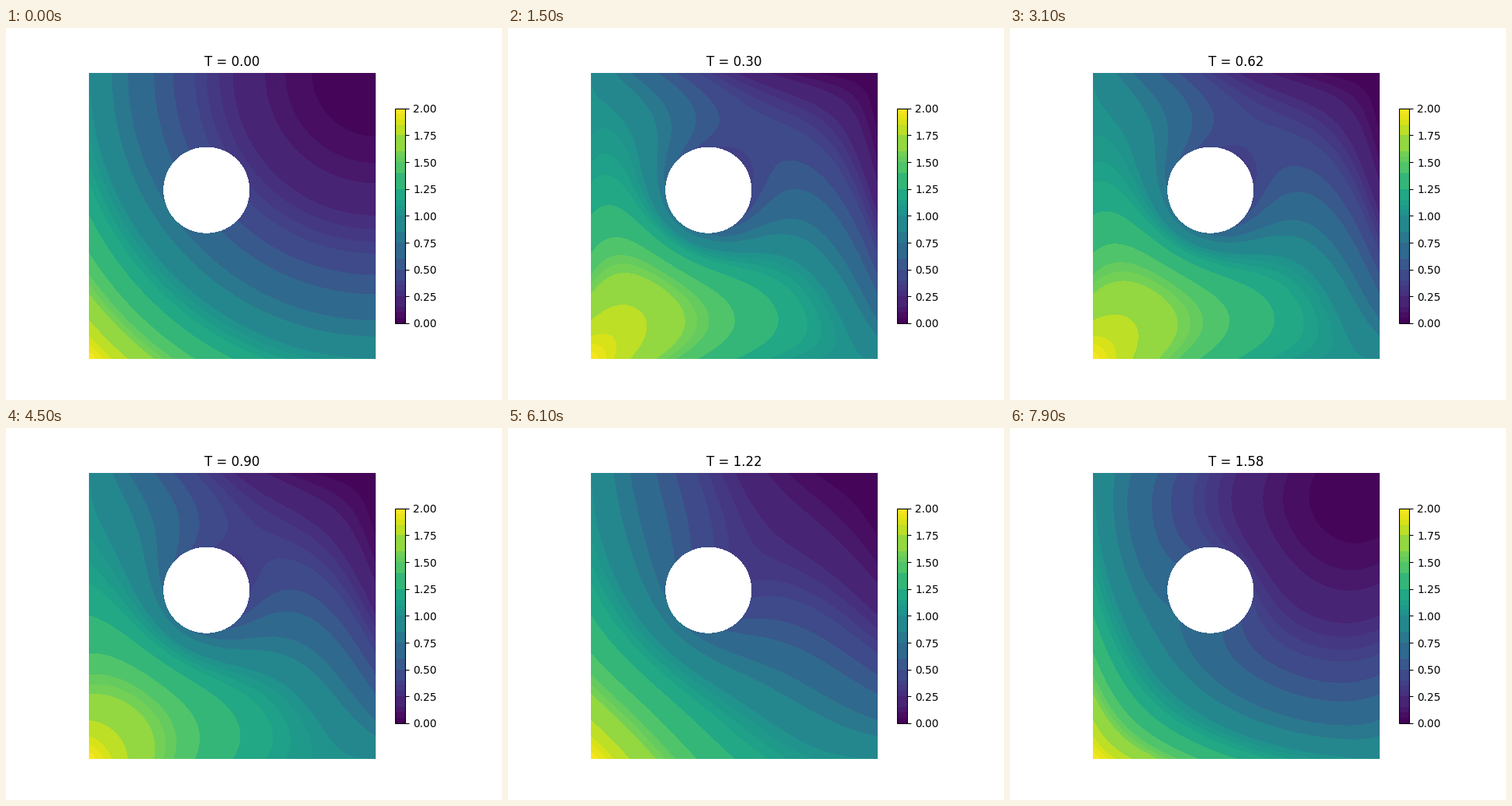
A matplotlib script that plays this animation: 640x480 px, repeating every 8000 ms.

```python
import numpy as np
import matplotlib.pyplot as plt
from matplotlib.animation import FuncAnimation
from matplotlib.cm import ScalarMappable
from matplotlib.colors import BoundaryNorm, ListedColormap
from matplotlib.patches import Circle

FRAMES, STEP = 80, 0.02       # frames per loop, model time per frame
N, SUB = 101, 150             # grid points per side, substeps per frame
KAPPA, OMEGA = 0.16, 1.4      # diffusivity, forcing frequency
HOLE, RADIUS = (0.41, 0.59), 0.149

LEVELS = np.array([0, .05, .1, .15, .25, .3, .35, .4, .5, .6, .75, .85, 1,
                   1.05, 1.1, 1.15, 1.25, 1.4, 1.5, 1.55, 1.6, 1.75,
                   1.85, 1.9, 1.95, 2])
BANDS = plt.get_cmap("viridis")((LEVELS[:-1] + LEVELS[1:]) / 4)

axis = np.linspace(0, 1, N)
X, Y = np.meshgrid(axis, axis)
BASE = (1 - X) ** 2 + (1 - Y) ** 2


def solve():
    """Heat flow with an oscillating source; all edges keep their start value."""
    inner = (slice(1, -1), slice(1, -1))
    x, y = X[inner], Y[inner]
    free = np.hypot(x - HOLE[0], y - HOLE[1]) > RADIUS
    gain = 3.7 - 1.35 * (x + y)
    dt = STEP / SUB
    ratio = KAPPA * dt * (N - 1) ** 2
    v = np.zeros((N, N))
    fields = [BASE.copy()]
    for k in range(1, FRAMES):
        t = (k - 0.5) * STEP
        source = dt * (0.52 + gain * np.cos(OMEGA * t))
        for _ in range(SUB):
            c = v[inner]
            lap = v[:-2, 1:-1] + v[2:, 1:-1] + v[1:-1, :-2] + v[1:-1, 2:] - 4 * c
            v[inner] = (c + ratio * lap + source) * free
        fields.append(np.clip(BASE + v, 0, 2))
    return fields


fields = solve()

fig, ax = plt.subplots(figsize=(6.4, 4.8), dpi=100)
ax.set(xlim=(0, 1), ylim=(0, 1), aspect="equal")
ax.axis("off")
title = ax.set_title("T = 0.00")
ax.add_patch(Circle(HOLE, RADIUS, fc="white", ec="none", aa=False, zorder=3))

cmap = ListedColormap(BANDS)
scale = ScalarMappable(BoundaryNorm(LEVELS, cmap.N), cmap)
bar = fig.colorbar(scale, ax=ax, shrink=0.75, spacing="proportional",
                   ticks=np.arange(0, 2.01, 0.25), format="%.2f")
bar.minorticks_off()

layers = []


def update(k):
    while layers:
        layers.pop().remove()
    layers.append(ax.contourf(X, Y, fields[k], levels=LEVELS, colors=BANDS))
    title.set_text(f"T = {k * STEP:.2f}")
    return [title]


anim = FuncAnimation(fig, update, frames=FRAMES, interval=100,
                     init_func=lambda: update(0), repeat=True, repeat_delay=0)
plt.show()
```
